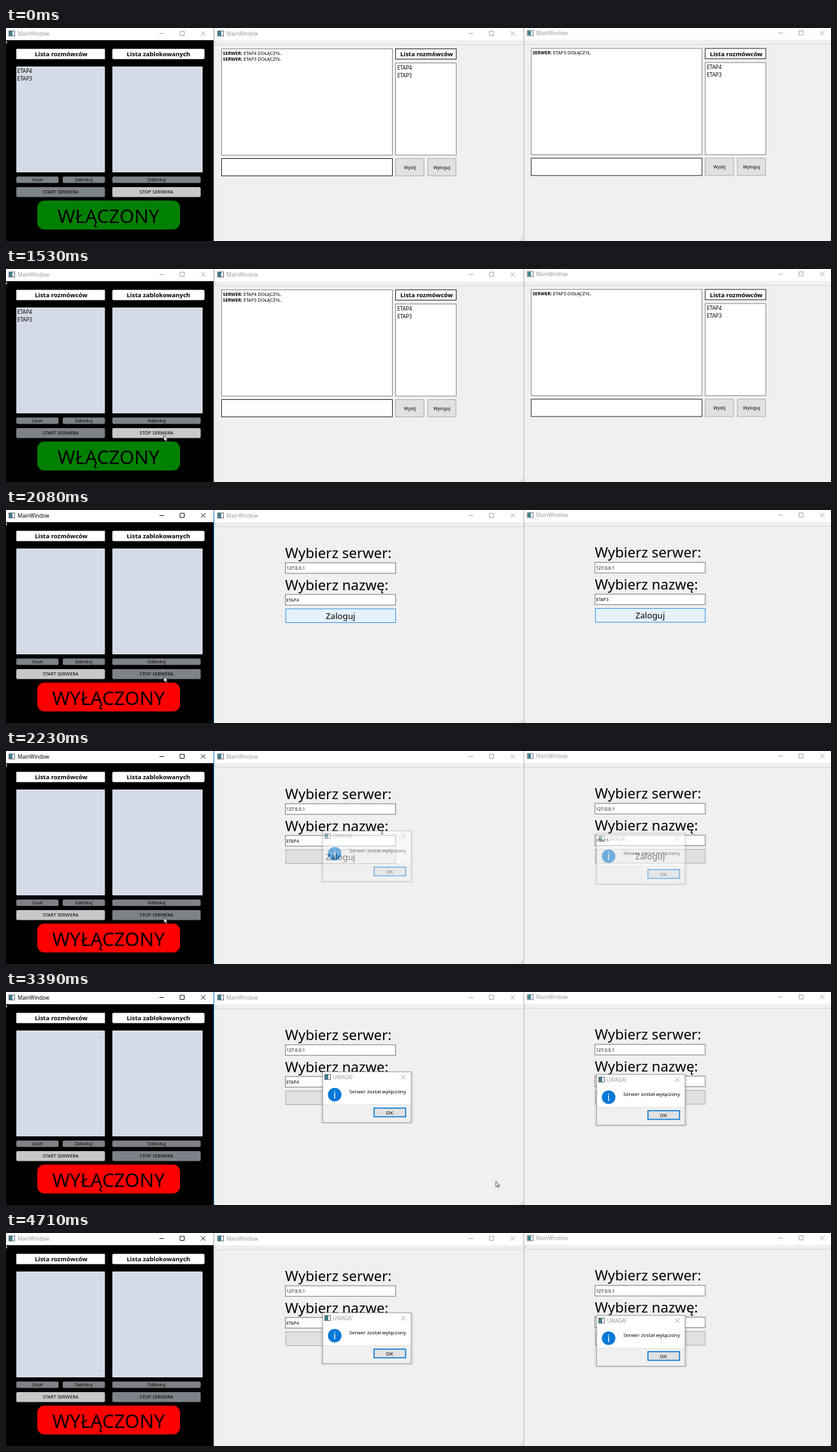
These frames come from a looping animation (1280 px wide and 332 px high, 4.79 s). An HTML page:

```html
<!DOCTYPE html>
<html lang="pl">
<head>
<meta charset="utf-8">
<title>Czat</title>
<style>
html, body { margin: 0; width: 100%; height: 100%; overflow: hidden; background: #f0f0f0; }
svg { display: block; width: 1280px; height: 332px; font-family: "Noto Sans", "Open Sans", sans-serif; }
</style>
</head>
<body>
<svg id="stage" viewBox="0 0 1280 332"></svg>
<script>
const LOOP = 4790, CLICK = 1990, STOP = 2080, DIALOG = 2150, BLUR = 4710;
const USERS = ['ETAP4', 'ETAP3'];

// Pointer stops: time, x, y; an entry without a place hides the pointer.
const PATH = [
  [0], [450, 828, 326], [530, 786, 317], [610, 716, 304], [690, 634, 290],
  [760, 560, 279], [830, 500, 272], [910, 459, 270], [990, 432, 270],
  [1070, 398, 269], [1150, 352, 267], [1230, 308, 264], [1300, 276, 262],
  [1370, 255, 260], [1450, 245.5, 259.5], [1530, 245, 259.5],
  [3070, 258, 258], [3150, 330, 264], [3230, 470, 276], [3310, 624, 288],
  [3390, 760, 295], [3470, 860, 296], [3550, 914, 295], [3620, 960, 298],
  [3700, 1025, 303], [3780, 1092, 309], [3860, 1155, 316], [3940, 1211, 325], [4010]
];

const rect = (x, y, w, h, fill, stroke = 'none', extra = '') =>
  `<rect x="${x}" y="${y}" width="${w}" height="${h}" fill="${fill}" stroke="${stroke}" ${extra}/>`;
const text = (x, y, size, s, extra = '') =>
  `<text x="${x}" y="${y}" font-size="${size}" ${extra}>${s}</text>`;
const mid = (x, y, size, s, extra = '') => text(x, y, size, s, `text-anchor="middle" ${extra}`);
const heading = (x, y) => mid(x, y, 9.5, 'Lista rozmówców', 'font-weight="700"');
const group = (id, body, extra = '') => `<g id="${id}" ${extra}>${body}</g>`;
const move = (x, y, body) => `<g transform="translate(${x} ${y})">${body}</g>`;
const cross = (x, y) => `M${x - 3.5} ${y - 3.5}l7 7m0 -7l-7 7`;

const icon = (x, y) =>
  rect(x + .5, y + .5, 9, 8, '#fff', '#6a7076') + rect(x + 1, y + 1, 5, 7, '#3f7f8c');

const titleBar = (x, w, buttonX, id, color) =>
  rect(x, 0, w, 19, '#fff') + icon(x + 4, 4) +
  text(x + 18, 11.5, 8, 'MainWindow', `id="${id}Name" fill="${color}"`) +
  `<path id="${id}Buttons" d="M${buttonX - 3.5} 8.5h7m25 -3.5h6.5v6.5h-6.5z${cross(buttonX + 64.5, 8.5)}"
    fill="none" stroke="${color}" stroke-width=".9"/>`;

const userList = (x, y) => USERS.map((u, i) => text(x, y + 12 * i, 8, u)).join('');

const serverButton = (id, x, y, w, h, label, size, fill = '#7d8288') =>
  rect(x, y, w, h, fill, 'none', `rx="2" id="${id}"`) +
  mid(x + w / 2, y + h / 2 + size * .36, size, label);

function serverWindow() {
  return rect(0, 0, 323, 332, '#000') + titleBar(0, 323, 241.5, 'server', '#999') +
    rect(0, 20, 1.5, 4, '#bbb') +
    rect(16, 32.5, 137.5, 16, '#fff') + rect(165, 32.5, 143, 16, '#fff', 'none', 'rx="2"') +
    heading(85.5, 44) + mid(236.5, 44, 9.5, 'Lista zablokowanych', 'font-weight="700"') +
    rect(16, 60, 137.5, 165, '#d4dbe6', 'none', 'rx="1"') +
    rect(165, 60, 140, 165, '#d4dbe6', 'none', 'rx="1"') +
    group('online', userList(17.5, 69.5)) +
    serverButton('kick', 16, 231.5, 65.5, 10, 'Usuń', 6.7) +
    serverButton('ban', 88, 231.5, 65.5, 10, 'Zablokuj', 6.7) +
    serverButton('unban', 165, 231.5, 137, 10, 'Odblokuj', 6.7) +
    serverButton('start', 16, 248, 137.5, 15.5, 'START SERWERA', 7.3) +
    serverButton('stop', 165, 248, 137, 15.5, 'STOP SERWERA', 7.3) +
    rect(48.5, 269, 221.5, 45, 'green', 'none', 'rx="11" id="badge"') +
    mid(159, 303.5, 29.4, '', 'id="status"') +
    rect(322, 0, 1, 332, '#aaa', 'none', 'id="edge"');
}

const button = (x, y, w, h, label) =>
  rect(x, y, w, h, '#e1e1e1', '#adadad') + mid(x + w / 2, y + h / 2 + 2.5, 6.9, label);

const chat = joined =>
  rect(334.5, 32.5, 265, 165.5, '#fff', '#828790') +
  joined.map((u, i) => text(336.5, 41.8 + 9 * i, 7.1,
    `<tspan font-weight="700">SERWER:</tspan> ${u} DOŁĄCZYŁ.`)).join('') +
  rect(604.5, 32.5, 94, 16, '#fff', '#222') + heading(652.5, 44.2) +
  rect(604.5, 54.5, 94, 143.5, '#fff', '#828790') + userList(607, 64.5) +
  rect(334.5, 203.5, 265, 27, '#fff', '#222') +
  button(604.5, 203.5, 44, 27, 'Wyslij') + button(654.5, 203.5, 43.5, 27, 'Wyloguj');

const field = (y, value) =>
  rect(433.5, y, 171, 16.5, '#fff', '#7a7a7a') + text(435, y + 11, 6.8, value);

const login = user =>
  text(433, 75, 22, 'Wybierz serwer:') + field(82.2, '127.0.0.1') +
  text(433, 124.5, 22, 'Wybierz nazwę:') + field(131.7, user) +
  rect(434, 154, 170.5, 21.5, '#e5f1fb', '#2f8fdf', 'class="loginButton"') +
  mid(519, 169.8, 13.2, 'Zaloguj');

function clientWindow(id, joined, user) {
  let grip = '';
  for (let i = 0; i < 3; i++)
    for (let j = 0; j <= i; j++) grip += rect(801 - 2 * j, 326.5 + 2 * i, 1, 1, '#aaa');
  return rect(323, 0, 480, 334, '#f0f0f0') + titleBar(324, 479, 721.5, id, '#999') +
    rect(323, 25.5, 480, 1, '#d5d5d5') + rect(325, 21, 1, 3, '#bbb') + grip +
    group(id + 'Chat', chat(joined)) + group(id + 'Login', login(user));
}

const dialog = () =>
  [4, 3, 2, 1].map(d => rect(491.5 - d, 125 - d / 2, 137 + 2 * d, 79 + d, '#000', 'none',
    'rx="2" opacity=".035"')).join('') +
  rect(491.5, 124.5, 137, 79, '#fff', '#a5a5a5') + rect(492, 175.5, 136, 27.5, '#f0f0f0') +
  rect(492, 175, 136, .7, '#dfdfdf') + icon(494, 128) +
  text(507, 136, 8, 'UWAGA!', 'fill="#999"') +
  `<path d="${cross(616.5, 132.7)}" stroke="#999" stroke-width=".9"/>` +
  '<circle cx="510" cy="160" r="10.6" fill="#0078d7"/>' +
  mid(510, 165.6, 15.5, 'i', 'fill="#fff"') +
  text(532.7, 157.8, 7.75, 'Serwer został wyłączony') +
  rect(571, 181, 49, 13.5, '#e1e1e1', '#0078d7', 'stroke-width="1.6"') +
  mid(595, 190.8, 7.9, 'OK');

const stage = document.getElementById('stage');
stage.innerHTML =
  clientWindow('left', USERS, USERS[0]) +
  move(480.4, -.6, clientWindow('right', [USERS[1]], USERS[1])) +
  rect(803, 0, 1, 332, '#b4b4b4') + serverWindow() +
  group('dialogs', dialog() + move(425, 4, dialog())) +
  '<circle id="ring" cx="244.5" cy="260.5" r="8.2" fill="#e6dc1e" opacity=".7"/>' +
  '<path id="pointer" d="M0 0v8.6l2 -1.7l1.4 3l1.4 -.7l-1.4 -2.8h2.6z" fill="#fff" stroke="#222" stroke-width=".8"/>';

const $ = id => document.getElementById(id);
const set = (id, name, value) => $(id).setAttribute(name, value);
const show = (id, on) => set(id, 'visibility', on ? 'visible' : 'hidden');

function draw(t) {
  const off = t >= STOP, active = t >= CLICK && t < BLUR;
  set('serverName', 'fill', active ? '#000' : '#999');
  set('serverButtons', 'stroke', t >= CLICK ? '#000' : '#999');
  set('edge', 'fill', active ? '#1c7fc4' : '#aaa');

  show('online', !off);
  set('start', 'fill', off ? '#c6c8c9' : '#7d8288');
  set('stop', 'fill', off ? '#7d8288' : '#c6c8c9');
  set('badge', 'fill', off ? '#f00' : '#008000');
  $('status').textContent = off ? 'WYŁĄCZONY' : 'WŁĄCZONY';

  for (const id of ['left', 'right']) {
    show(id + 'Chat', !off);
    show(id + 'Login', off);
  }
  for (const b of document.querySelectorAll('.loginButton')) {
    b.setAttribute('fill', t >= DIALOG ? '#e1e1e1' : '#e5f1fb');
    b.setAttribute('stroke', t >= DIALOG ? '#adadad' : '#2f8fdf');
  }
  const fade = Math.floor((t - DIALOG) / 76.6 + 1) / 4;
  set('dialogs', 'opacity', Math.max(0, Math.min(1, fade)));
  show('ring', t >= CLICK && t < STOP);

  const [, x, y] = PATH.findLast(p => p[0] <= t);
  show('pointer', x !== undefined);
  if (x !== undefined) set('pointer', 'transform', `translate(${x} ${y})`);
}

const begin = performance.now();
function tick() {
  draw((performance.now() - begin) % LOOP);
  requestAnimationFrame(tick);
}
tick();
</script>
</body>
</html>
```
